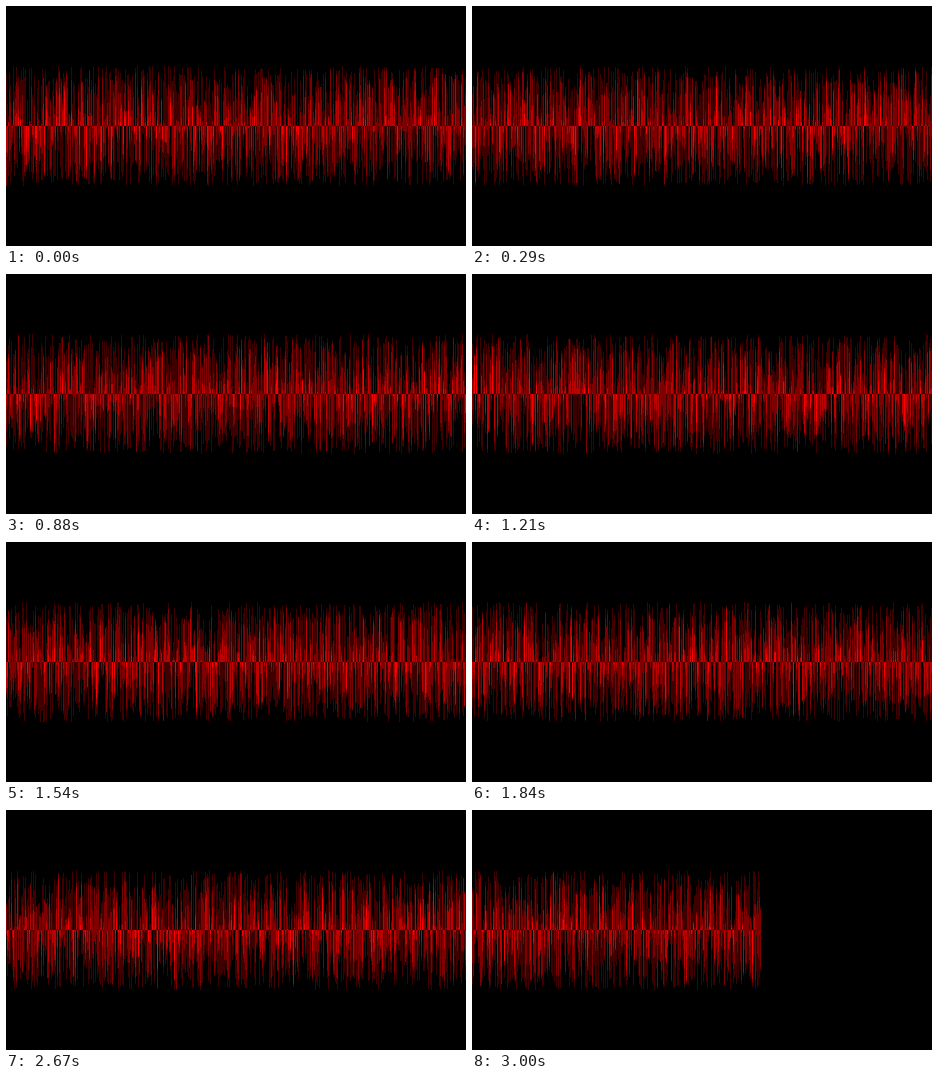
Recreate the animation shown at these times as an HTML page with a canvas. Size 460 by 240 pixels, loop 3040 ms.

```html
<!DOCTYPE html>
<html lang="en">
<head>
<meta charset="utf-8">
<title>Noise waveform</title>
<style>
html, body { margin: 0; width: 100%; height: 100%; overflow: hidden; background: #000; }
canvas { display: block; }
</style>
</head>
<body>
<canvas id="stage" width="460" height="240"></canvas>
<script>
const W = 460, H = 240, MID = H / 2, AMP = 60;
const LOOP = 3040, FRAMES = 73, LAST_WIDTH = 289;
const RATE = 44.1, PER_COLUMN = 4, PER_FRAME = W * PER_COLUMN; // RATE: samples per ms
const ctx = document.getElementById('stage').getContext('2d');

// White noise from a 64-bit linear congruential generator with a double as its state
function makeNoise(count) {
  const heights = new Int8Array(count);
  let state = 0;
  for (let i = 0; i < count; i++) {
    state = Number(BigInt.asUintN(64, BigInt(state) * 1664525n + 1013904223n));
    heights[i] = Math.round((1 - 2 * state / 2 ** 64) * AMP);
  }
  return heights;
}

const noise = makeNoise(FRAMES * PER_FRAME);

// Frames follow the sample rate, on a 10 ms clock
const startOf = k => 10 * Math.round(k * PER_FRAME / RATE / 10);

function frameAt(t) {
  let k = FRAMES - 1;
  while (k > 0 && startOf(k) > t) k--;
  return k;
}

// Every sample is a line from the middle; overlapping lines add up to full red
function draw(k) {
  const count = (k === FRAMES - 1 ? LAST_WIDTH : W) * PER_COLUMN;
  ctx.globalCompositeOperation = 'source-over';
  ctx.fillStyle = '#000';
  ctx.fillRect(0, 0, W, H);
  ctx.globalCompositeOperation = 'lighter';
  ctx.fillStyle = 'rgb(63, 0, 0)';
  for (let i = 0; i < count; i++) {
    ctx.fillRect(Math.floor(i / PER_COLUMN), MID, 1, noise[k * PER_FRAME + i]);
  }
}

let shown = -1;
const begin = performance.now();

function tick() {
  const k = frameAt((performance.now() - begin) % LOOP);
  if (k !== shown) draw(shown = k);
  requestAnimationFrame(tick);
}
tick();
</script>
</body>
</html>
```
